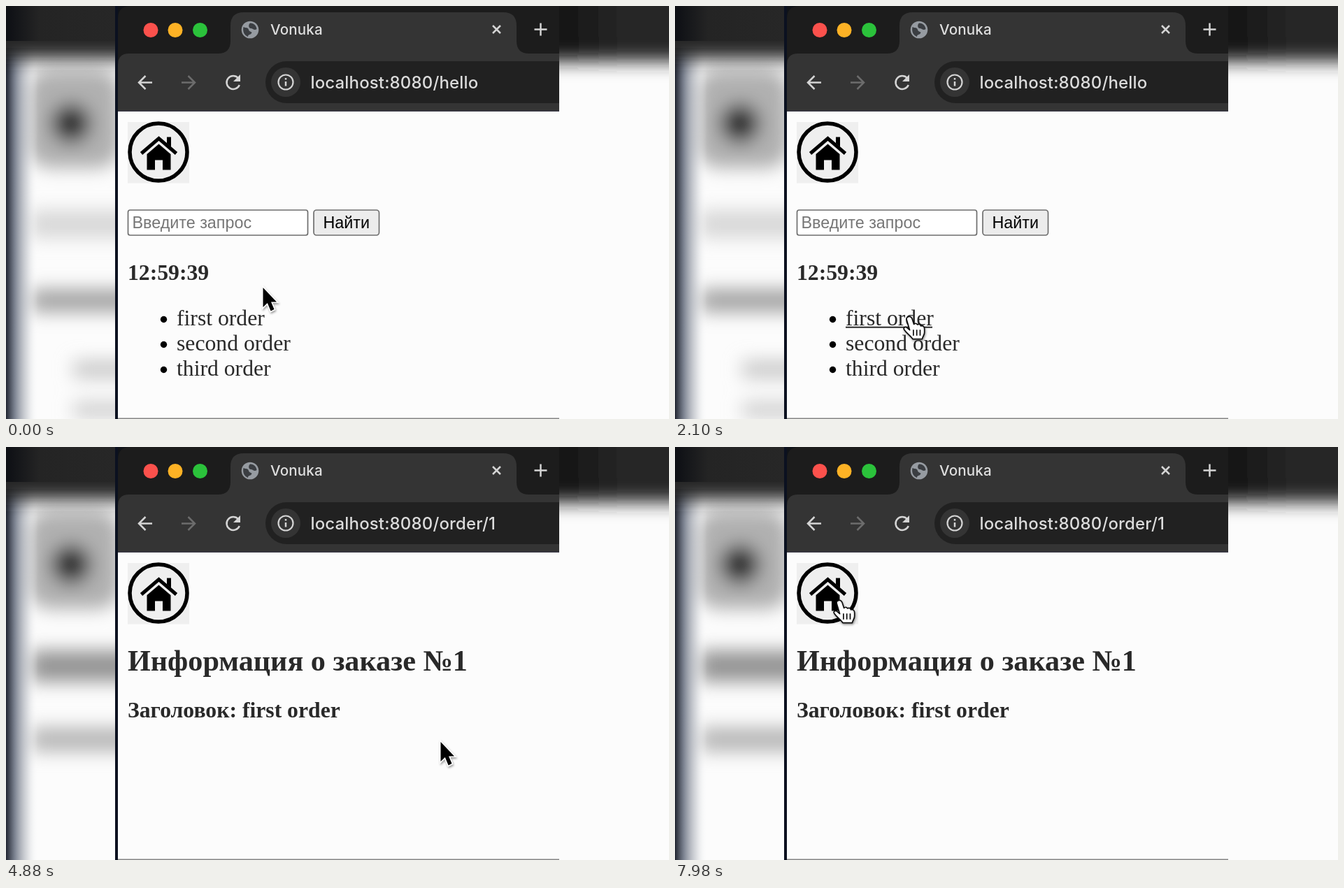
Recreate the animation shown at these times as an HTML page. Size 948 px wide and 591 px high, loop 8 s.

```html
<!DOCTYPE html>
<html lang="ru">
<head>
<meta charset="utf-8">
<title>Orders</title>
<style>
  html, body { margin: 0; width: 100%; height: 100%; overflow: hidden; background: #fcfcfc; }
  svg { display: block; width: 100vw; height: 100vh; }
  text { white-space: pre; }
  .ui { font-family: Inter, Roboto, sans-serif; font-weight: 450; letter-spacing: .15px; }
  .serif { font-family: "Liberation Serif", "Times New Roman", serif; font-size: 31.7px; fill: #292929; }
  .bold { font-weight: 700; }
  .form { font-family: "Liberation Sans", Arial, sans-serif; font-size: 23.33px; }
  .line { fill: none; stroke: #d4d4d4; stroke-width: 2.5; }
</style>
</head>
<body>
<svg viewBox="0 0 948 591" preserveAspectRatio="none">
  <defs>
    <linearGradient id="edge">
      <stop offset="0" stop-color="#202430"/>
      <stop offset=".28" stop-color="#687080" stop-opacity=".85"/>
      <stop offset=".65" stop-color="#b4b8c0" stop-opacity=".5"/>
      <stop offset="1" stop-color="#fff" stop-opacity="0"/>
    </linearGradient>
    <linearGradient id="topLeft">
      <stop offset="0" stop-color="#0d0f14"/>
      <stop offset=".3" stop-color="#242424"/>
      <stop offset="1" stop-color="#272727"/>
    </linearGradient>
    <linearGradient id="topRight" gradientUnits="userSpaceOnUse" x1="791" x2="880">
      <stop offset="0" stop-color="#141414"/>
      <stop offset="1" stop-color="#262626"/>
    </linearGradient>
    <filter id="soft" x="-50%" y="-100%" width="200%" height="300%"><feGaussianBlur stdDeviation="13"/></filter>
    <filter id="shade" x="-50%" y="-50%" width="200%" height="200%">
      <feDropShadow dx="1" dy="2" stdDeviation="1.8" flood-opacity=".4"/>
    </filter>
    <clipPath id="left"><rect width="157" height="591"/></clipPath>
    <clipPath id="right"><rect x="791" width="157" height="591"/></clipPath>
    <clipPath id="window"><rect x="160" width="631" height="591"/></clipPath>
  </defs>

  <rect width="948" height="591" fill="#fcfcfc"/>

  <!-- blurred surroundings -->
  <g clip-path="url(#left)">
    <g filter="url(#soft)">
      <rect x="30" y="90" width="134" height="142" rx="34" fill="#b0b0b0"/>
      <circle cx="93" cy="168" r="28" fill="#303030"/>
      <g id="listBlur">
        <rect x="35" y="292" width="150" height="40" fill="#d8d8d8"/>
        <rect x="36" y="405" width="150" height="33" fill="#a4a4a4"/>
        <rect x="96" y="507" width="90" height="26" fill="#cacaca"/>
        <rect x="96" y="566" width="90" height="24" fill="#d0d0d0"/>
      </g>
      <g id="orderBlur">
        <rect x="35" y="291" width="150" height="45" fill="#959595"/>
        <rect x="36" y="401" width="150" height="35" fill="#b8b8b8"/>
      </g>
    </g>
    <rect width="46" height="591" fill="url(#edge)"/>
    <rect x="-60" y="-60" width="300" height="136" fill="#262626" filter="url(#soft)"/>
    <rect width="157" height="50" fill="url(#topLeft)"/>
  </g>
  <g clip-path="url(#right)">
    <rect x="700" y="-60" width="320" height="139" fill="url(#topRight)" filter="url(#soft)"/>
  </g>

  <!-- browser window -->
  <rect x="156" width="5" height="591" fill="#0b1120"/>
  <g clip-path="url(#window)">
    <rect x="160" width="631" height="151" fill="#101318"/>
    <path d="M160 80V18Q160 0 178 0H791V80Z" fill="#1c1c1c"/>
    <path d="M160 151V84Q160 68 176 68H303Q321 68 321 50V28Q321 9 340 9H711Q730 9 730 28V50Q730 68 748 68H791V151Z" fill="#343434"/>
    <rect x="160" y="149.500" width="631" height="1.500" fill="#393844"/>
    <rect x="371" y="79" width="480" height="60" rx="30" fill="#212121"/>
    <circle cx="400" cy="109" r="21" fill="#343434"/>
    <rect x="160" y="151" width="631" height="440" fill="#fcfcfc"/>
    <rect x="160" y="589.5" width="631" height="1.5" fill="#858585"/>
  </g>
  <circle cx="207" cy="34.500" r="10.5" fill="#fb514c"/>
  <circle cx="242" cy="34.500" r="10.5" fill="#fdb225"/>
  <circle cx="277.500" cy="34.500" r="10.5" fill="#2bc23b"/>
  <g id="globe">
    <circle r="12.300" fill="#969ba1"/>
    <path d="M-9.500-4C-6-2-3-4-2 0S4 2 2 5-3 6-3 10C-8 8-11 3-9.500-4ZM0-9.500C5-10 9-6 9.500-1 6 2 4-2 1-2S-3-7 0-9.500Z" fill="#3b3e42"/>
  </g>
  <text class="ui" x="378" y="41" font-size="20.6" fill="#dedede">Vonuka</text>
  <path class="line" d="M696 28l11 11m0-11l-11 11"/>
  <path class="line" d="M755.500 33.500h18m-9-9v18"/>
  <path class="line" d="M209 109.500H190m9.500-9.500l-9.500 9.500 9.500 9.500"/>
  <path class="line" d="M251 109.500h19m-9.500-9.500l9.500 9.500-9.500 9.500" style="stroke:#6c6c6c"/>
  <path class="line" d="M332 103A9.500 9.500 0 1 0 333.800 113"/>
  <path d="M335 98v10h-10Z" fill="#d4d4d4"/>
  <circle class="line" cx="400" cy="109" r="10.5" style="stroke-width:2.2"/>
  <path class="line" d="M400 108v6.500m0-11.500v2.600"/>
  <text class="ui" id="url" x="435.500" y="117.500" font-size="24" fill="#dcdcdc"></text>

  <!-- home button -->
  <rect x="174" y="166" width="88" height="87.500" fill="#efefef"/>
  <circle cx="218" cy="209" r="41" fill="none" stroke="#000" stroke-width="5.500"/>
  <path d="M193.500 211L218.500 189.500 243.500 211" fill="none" stroke="#000" stroke-width="5"/>
  <path d="M230 187.500h6v14l-6-5ZM201.500 212L218.500 197.500 235.500 212V234.500H224V220.500H213V234.500H201.500Z"/>

  <g id="listPage">
    <rect x="174.500" y="292" width="257" height="36" rx="3" fill="#fff" stroke="#6e6e6e" stroke-width="1.700"/>
    <text class="form" x="180.500" y="318" fill="#767676">Введите запрос</text>
    <rect x="440" y="292" width="93.500" height="36" rx="4" fill="#ececec" stroke="#707070" stroke-width="1.700"/>
    <text class="form" x="453.500" y="318">Найти</text>
    <text class="serif bold" x="174" y="392">12:59:39</text>
    <g id="items"></g>
    <rect id="underline" x="244" y="458.700" width="124" height="2" fill="#292929"/>
  </g>
  <g id="orderPage">
    <text class="serif bold" x="174" y="319.500" style="font-size:42.2px">Информация о заказе №1</text>
    <text class="serif bold" x="174" y="386.500">Заголовок: first order</text>
  </g>

  <g id="arrow" filter="url(#shade)">
    <path d="M.5 1V29L6.800 23 11.600 34.500 16.500 32 12 21.500H20Z" stroke="#fff" stroke-width="3" paint-order="stroke"/>
  </g>
  <g id="hand" filter="url(#shade)">
    <path d="M9 1.500C12 1 13 3 14 6L16.300 13C18 11 20.500 11.500 21.500 13.500 23.500 12 26 13 26.500 15.500 29.500 14.500 32 16.500 32 20V25C32 29 29.500 31 28.500 35H14.500C12 31 6 27 1.800 21 0 18 3 16 6 18L10 21.500 5.500 6.500C4.700 4 6 2 9 1.500Z" fill="#fff" stroke="#111" stroke-width="1.800" stroke-linejoin="round"/>
    <path d="M15.500 21v9m5-9v9m5-9v9" stroke="#111" stroke-width="1.800"/>
  </g>
</svg>
<script>
const LOOP = 8000, OPEN = 2600;
const $ = id => document.getElementById(id);
const show = (id, on) => $(id).setAttribute('display', on ? 'inline' : 'none');
const move = (id, x, y, scale = 1) =>
  $(id).setAttribute('transform', `translate(${x} ${y}) scale(${scale})`);
const clamp = v => Math.max(0, Math.min(1, v));

$('items').innerHTML = ['first', 'second', 'third'].map((name, i) => `
  <circle cx="225.500" cy="${448.5 + i * 36}" r="4.700"/>
  <text class="serif" x="244" y="${456.500 + i * 36}">${name} order</text>`).join('');

// pointer stops: time, x, y
const stops = [
  [0, 367, 402], [680, 352, 415], [1500, 334, 445], [2600, 334, 445],
  [3060, 567, 413], [3500, 614, 421], [4880, 621, 421], [6320, 615, 421],
  [6900, 615, 421], [7700, 234, 220], [LOOP, 234, 220]
];

function pointerAt(t) {
  const i = stops.findIndex(s => s[0] > t);
  const [t0, x0, y0] = stops[i - 1], [t1, x1, y1] = stops[i];
  const p = (t - t0) / (t1 - t0), e = p * p * (3 - 2 * p);
  return [x0 + (x1 - x0) * e, y0 + (y1 - y0) * e];
}

const inside = (x, y, l, t, r, b) => x >= l && x <= r && y >= t && y <= b;

function draw(t) {
  const opened = t >= OPEN;
  const [x, y] = pointerAt(t);
  const onLink = !opened && inside(x, y, 244, 430, 368, 465);
  const onHome = inside(x, y, 174, 166, 262, 254);

  show('listPage', !opened);
  show('listBlur', !opened);
  show('orderPage', opened);
  show('orderBlur', opened);
  show('underline', onLink);
  $('url').textContent = 'localhost:8080/' + (opened ? 'order/1' : 'hello');
  move('globe', 349, 34, opened ? 0.85 + 0.15 * clamp((t - 3060) / 160) : 1);

  show('hand', onLink || onHome);
  show('arrow', !(onLink || onHome));
  move('arrow', x, y);
  move('hand', x - 8, y - 2, 0.96);
}

function frame() {
  draw(performance.now() % LOOP);
  requestAnimationFrame(frame);
}
frame();
</script>
</body>
</html>
```
